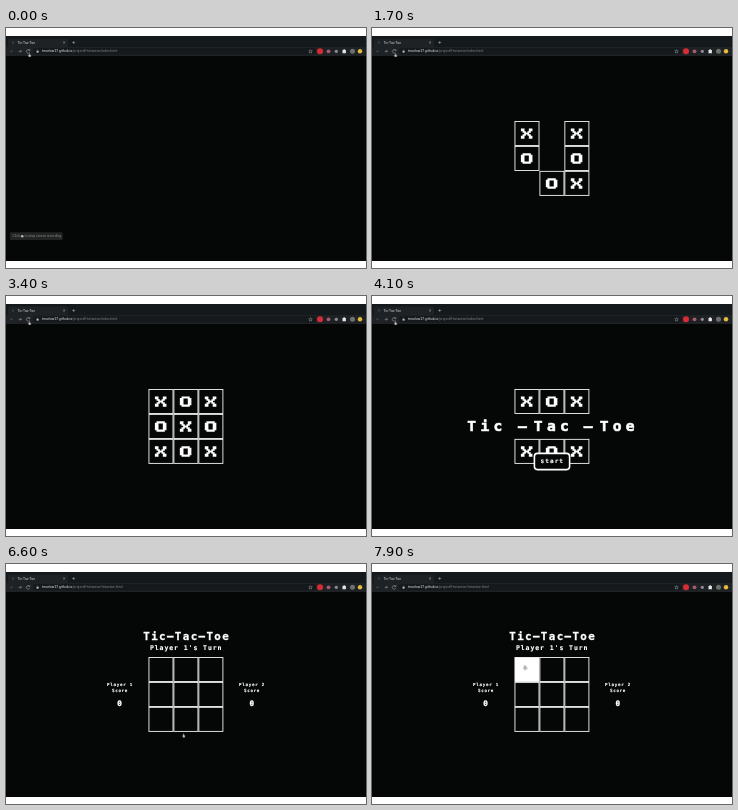
Write an HTML page that moves like this. It is 360 px wide and 240 px high and loops after 8000 ms.

```html
<!DOCTYPE html>
<html lang="en">
<head>
<meta charset="utf-8">
<title>Tic-Tac-Toe</title>
<style>
  html, body { margin: 0; width: 100%; height: 100%; overflow: hidden; background: #fff; }
  svg { display: block; width: 360px; height: 240px; }
  .ui { font-family: Roboto, Arial, sans-serif; font-size: 3.4px; fill: #85888a; }
  .lit { fill: #e0e1e1; }
  .pixel { font-family: "DejaVu Sans Mono", monospace; font-weight: bold; fill: #fff; text-anchor: middle; }
  .logo { font-size: 14.6px; letter-spacing: 4.3px; stroke: #fff; stroke-width: .6; }
  .title { font-size: 10.8px; letter-spacing: 1.4px; stroke: #fff; stroke-width: .3; }
  .turn { font-size: 6.5px; letter-spacing: .92px; stroke: #fff; stroke-width: .15; }
  .score { font-size: 4.2px; letter-spacing: .7px; stroke: #fff; stroke-width: .15; }
  .zero { font-size: 7.6px; stroke: #fff; stroke-width: .4; }
  .start { font-size: 6px; letter-spacing: 1.1px; stroke: #fff; stroke-width: .15; }
  .icon { fill: none; stroke: #b4b6b8; stroke-width: .5; }
  .cell { stroke: #f4f4f4; stroke-width: .9; }
</style>
</head>
<body>
<svg viewBox="0 0 360 240">
  <rect y="8" width="360" height="225" fill="#040705"/>

  <!-- browser bar -->
  <rect y="8" width="360" height="12" fill="#14191b"/>
  <path d="M2 20V12.5q0-2 2-2H60q2 0 2 2V20z" fill="#1e2225"/>
  <rect y="19" width="360" height="9" fill="#1e2225"/>
  <rect x="27" y="20" width="283" height="6.6" rx="3.3" fill="#15191b"/>
  <g class="ui">
    <circle cx="7" cy="14.5" r="1" fill="#45494c"/>
    <text class="lit" x="11.5" y="15.7">Tic-Tac-Toe</text>
    <text id="introUrl" x="36" y="24.4"><tspan class="lit">tmarlow27.github.io</tspan>/project0-tictactoe/index.html</text>
    <text id="gameUrl" x="36" y="24.4"><tspan class="lit">tmarlow27.github.io</tspan>/project0-tictactoe/tictactoe.html</text>
  </g>
  <g class="icon">
    <path d="M57.2 13.6l1.8 1.8m0-1.8l-1.8 1.8M66.2 14.5h3m-1.5-1.5v3"/>
    <path d="M7.2 23.3H4.6m1.2-1.2l-1.2 1.2 1.2 1.2" stroke="#55595c"/>
    <path d="M12.6 23.3h2.8m-1.2-1.2l1.2 1.2-1.2 1.2"/>
    <path d="M23.4 22.1a1.8 1.8 0 1 0 .3 2.2M23.8 21.2v1.4h-1.5"/>
    <path d="M304.5 21.6l.5 1.2 1.3.1-1 .9.3 1.3-1.1-.7-1.1.7.3-1.3-1-.9 1.3-.1z" stroke-width=".4"/>
    <path d="M31 23v-.5a.6.6 0 0 1 1.2 0V23" stroke-width=".4"/>
  </g>
  <rect x="30.6" y="23" width="2" height="1.6" fill="#c6c8ca"/>
  <circle cx="314" cy="23.3" r="3" fill="#d82c35"/>
  <circle cx="322.5" cy="23.3" r="1.9" fill="#a65a73"/>
  <circle cx="330.3" cy="23.3" r="1.6" fill="#8b8f92"/>
  <path d="M336.5 22h1v-.8h1.4v.8h1v3.2h-3.4z" fill="#e4e5e6"/>
  <circle cx="346.5" cy="23.3" r="2.5" fill="#6e706b"/>
  <circle cx="354" cy="23.3" r="2.2" fill="#e5bb3c"/>

  <g id="popup">
    <rect x="4" y="204.3" width="52.7" height="7.6" rx="1" fill="#212423"/>
    <g class="ui">
      <text x="6.5" y="209.4">Click</text>
      <circle cx="16.2" cy="208.2" r="1.3" fill="#b5b7b7"/>
      <text x="18.6" y="209.4">to stop screen recording</text>
    </g>
  </g>

  <g id="intro">
    <g id="marks"></g>
    <g id="splash">
      <g class="pixel logo">
        <text x="115" y="135.2">Tic</text>
        <text x="152.6" y="135.2">–</text>
        <text x="181.5" y="135.2">Tac</text>
        <text x="218.3" y="135.2">–</text>
        <text x="247.3" y="135.2">Toe</text>
      </g>
      <rect id="button" x="162.4" y="157.4" width="35.2" height="16.2" rx="3" stroke="#fff" stroke-width="1.6" fill="#040705"/>
      <text class="pixel start" x="180.3" y="167.2">start</text>
    </g>
  </g>

  <g id="game">
    <g class="pixel">
      <text class="title" x="180.7" y="75.6">Tic–Tac–Toe</text>
      <text class="turn" x="180.2" y="85.8">Player 1's Turn</text>
      <g class="score">
        <text x="114" y="122">Player 1</text>
        <text x="114" y="128">Score</text>
        <text x="246" y="122">Player 2</text>
        <text x="246" y="128">Score</text>
      </g>
      <text class="zero" x="113.6" y="142.3">0</text>
      <text class="zero" x="245.8" y="142.3">0</text>
    </g>
    <g id="board"></g>
  </g>

  <path id="cursor" d="M0 0l.7.3.3 1.2 1.2.4-.2 1.5-.7.7H.2L-.8 2.6l.3-.6.5.3z" fill="#d4d4d4" stroke="#333" stroke-width=".4"/>
</svg>
<script>
  const LOOP = 8000, SPLASH = 3550, PLAY = 6500;
  const DARK = "#040705";
  const CROSS = "M0 0h2.2v2h.8v.8h1v-.8h.8v-2h2.2v2h-1v1h-1v1h1v1h1v2h-2.2v-2h-.8v-.8h-1v.8h-.8v2h-2.2v-2h1v-1h1v-1h-1v-1h-1z";
  const NOUGHT = "M1 0h5v1h1v5h-1v1h-5v-1h-1v-5h1zM2.2 1.5v4h2.6v-4z";
  const get = id => document.getElementById(id);

  function add(parent, tag, attrs) {
    const el = document.createElementNS("http://www.w3.org/2000/svg", tag);
    for (const key in attrs) el.setAttribute(key, attrs[key]);
    return parent.appendChild(el);
  }

  // points: [time in ms, value]; equal times make a hard change
  function track(el, prop, points) {
    const all = [[0, points[0][1]], ...points, [LOOP, points.at(-1)[1]]];
    el.animate(all.map(([t, v]) => ({ offset: t / LOOP, [prop]: v })),
      { duration: LOOP, iterations: Infinity });
  }

  function show(el, from, to = LOOP) {
    const before = from > 0 ? 0 : 1, after = to < LOOP ? 0 : 1;
    track(el, "opacity", [[from, before], [from, 1], [to, 1], [to, after]]);
  }

  const cellX = i => 142.5 + 24.95 * (i % 3);
  const cellY = i => 93 + 24.95 * Math.floor(i / 3);

  function addCell(parent, i) {
    return add(parent, "rect", { class: "cell", x: cellX(i) + .45, y: cellY(i) + .45,
      width: 24.05, height: 24.05, fill: DARK });
  }

  // moves alternate between X and O
  [0, 3, 2, 5, 8, 7, 6, 1, 4].forEach((i, turn) => {
    const g = add(get("marks"), "g", {});
    addCell(g, i);
    add(g, "path", { d: turn % 2 ? NOUGHT : CROSS, fill: "#fff",
      transform: `translate(${cellX(i) + 6.4} ${cellY(i) + 7.4}) scale(1.65 1.48)` });
    const middleRow = i > 2 && i < 6;
    show(g, 300 + 250 * turn, middleRow ? SPLASH : PLAY);
  });

  const cells = [...Array(9).keys()].map(i => addCell(get("board"), i));
  track(cells[7], "fill", [[7320, DARK], [7400, "#323332"], [7480, "#606261"], [7700, DARK]]);
  track(cells[4], "fill", [[7480, DARK], [7540, "#343635"], [7660, DARK]]);
  track(cells[3], "fill", [[7530, DARK], [7590, "#343635"], [7720, DARK]]);
  track(cells[0], "fill", [[7580, DARK], [7860, "#fff"]]);

  show(get("popup"), 0, 500);
  show(get("splash"), SPLASH, PLAY);
  show(get("introUrl"), 0, PLAY);
  show(get("gameUrl"), PLAY);
  show(get("game"), PLAY);
  track(get("button"), "fill", [[5080, DARK], [5080, "#087609"]]);

  const at = (x, y) => `translate(${x}px, ${y}px)`;
  track(get("cursor"), "transform", [
    [4600, at(22.8, 25)], [4720, at(38, 41)], [4900, at(125, 125)],
    [5060, at(172, 164)], [5200, at(177, 169.5)], [7200, at(177, 169.5)],
    [7320, at(181, 168)], [7400, at(181.5, 166.5)], [7480, at(174, 145)],
    [7580, at(160, 117)], [7680, at(152.5, 101.5)]
  ]);
</script>
</body>
</html>
```
